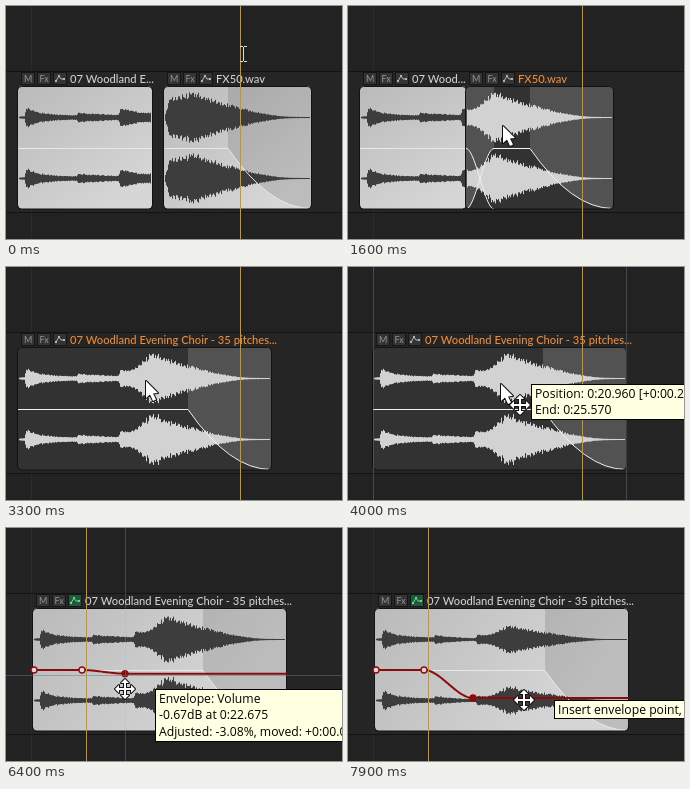
An HTML page with a canvas for the animation above (8 s loop, 336 px wide and 233 px high).

```html
<!DOCTYPE html>
<html>
<head>
<meta charset="utf-8">
<style>
html, body { margin: 0; width: 100%; height: 100%; overflow: hidden; background: #222; }
canvas { display: block; }
</style>
</head>
<body>
<canvas width="336" height="233"></canvas>
<script>
const c = document.querySelector('canvas').getContext('2d');
const W = 336, H = 233, TOP = 80, BOTTOM = 203, MID = 142;
const LOOP = 8000, STEP = 100, PX_PER_SEC = 54.88;
const TITLE = '07 Woodland Evening Choir - 35 pitches...';
const TITLE_FONT = '500 11.2px Lato, sans-serif';
const TIP_FONT = '500 12.2px "Open Sans", sans-serif';

const clamp = v => Math.max(0, Math.min(1, v));
const smooth = v => { v = clamp(v); return v * v * (3 - 2 * v); };
const noise = n => { const s = Math.sin(n * 127.1) * 43758.5; return s - Math.floor(s); };

// Linear interpolation through [position, value] points.
function along(points, p) {
  if (p <= points[0][0]) return points[0][1];
  for (let i = 1; i < points.length; i++) {
    const [a, va] = points[i - 1], [b, vb] = points[i];
    if (p <= b) return va + (vb - va) * (p - a) / (b - a);
  }
  return points[points.length - 1][1];
}

// Time, x, y of the pointer.
const path = [
  [0, 237, 48], [500, 195, 118], [600, 195, 118], [900, 183, 119], [1400, 155, 120],
  [1800, 155, 120], [2000, 110, 128], [2300, 219, 188], [2700, 140, 114], [3500, 140, 114],
  [4000, 153, 117], [4300, 155, 118], [4900, 69, 73], [5200, 69, 73], [5500, 72, 130],
  [5700, 76, 141], [6100, 119, 141], [6300, 119, 158], [7000, 119, 180], [7200, 119, 180],
  [7400, 125, 185], [7500, 125, 185], [7900, 176, 172]
];
const pointer = t => ({
  x: along(path.map(k => [k[0], k[1]]), t),
  y: along(path.map(k => [k[0], k[2]]), t)
});

// Wave envelopes, half height in pixels by distance from the clip's left edge.
const chime = [[0, .8], [6, 1.5], [8, 11], [12, 8.5], [20, 5.5], [40, 3], [58, 2.5], [60, 5],
  [75, 4], [100, 3], [102, 9.5], [110, 8.5], [120, 6], [134, 5]];
const blast = [[0, 1], [3, 12], [5, 20], [20, 24], [30, 28], [40, 21], [64, 14], [82, 8.5],
  [103, 3.5], [115, 1.6], [125, .8], [147, .5]];
const grain = n => .72 + .28 * noise(n);
const chimeAmp = x => along(chime, x) * grain(x);
const blastAmp = x => along(blast, x) * grain(x + 300);
const gluedAmp = x => {
  const f = smooth((x - 106) / 28);
  return (x < 134 ? chimeAmp(x) * (1 - f) : 0) + (x >= 106 ? blastAmp(x - 106) * f : 0);
};

function line(color, draw, width = 1) {
  c.strokeStyle = color;
  c.lineWidth = width;
  c.beginPath();
  draw();
  c.stroke();
}
const rect = (color, x, y, w, h) => { c.fillStyle = color; c.fillRect(x, y, w, h); };
const vertical = (x, color) => rect(color, x, 0, 1, H);

function text(str, x, y, color, font) {
  c.font = font;
  c.fillStyle = color;
  c.fillText(str, x, y);
}

function sCurve(x0, y0, x1, y1) {
  for (let x = x0; x <= x1; x++) c.lineTo(x, y0 + (y1 - y0) * smooth((x - x0) / (x1 - x0)));
}

function fadeCurve(x0, x1) {
  c.lineTo(x0, MID + .5);
  c.quadraticCurveTo((x0 + x1) / 2, BOTTOM - .5, x1, BOTTOM - .5);
}

// Fills the part of a fade that lies above its curve.
function shade(color, x0, x1, curve) {
  c.beginPath();
  c.moveTo(x0, TOP);
  curve();
  c.lineTo(x1, TOP);
  c.fillStyle = color;
  c.fill();
}

function fit(str, width) {
  c.font = TITLE_FONT;
  let n = 13;
  while (n > 1 && c.measureText(str.slice(0, n).trim() + '...').width > width) n--;
  return str.slice(0, n).trim() + '...';
}

function header(x, title, selected, green) {
  for (let i = 0; i < 3; i++) {
    const bx = x + 3 + i * 16, on = green && i === 2;
    rect('#161616', bx, 66, 14, 13);
    rect(on ? '#1f5a3a' : '#343434', bx + 1, 67, 12, 11);
    if (i < 2) text(['M', 'Fx'][i], bx + (i ? 2.5 : 3), 76, '#949494', '9px Lato, sans-serif');
    else {
      const color = on ? '#6fd494' : '#b4b4b4';
      line(color, () => {
        c.moveTo(bx + 3, 75); c.lineTo(bx + 6, 70); c.lineTo(bx + 8, 73); c.lineTo(bx + 11, 73);
      });
      rect(color, bx + 2, 74, 2, 2);
      rect(color, bx + 5, 69, 2, 2);
      rect(color, bx + 10, 72, 2, 2);
    }
  }
  text(title, x + 52, 77, selected ? '#ee8b3c' : '#cfcfcf', TITLE_FONT);
}

function item({ x, w, title, selected, amp, fade, cross = 0, green }) {
  const right = x + w, shadow = selected ? '#525252' : 'rgba(0,0,0,.12)';
  const fadeOut = () => fadeCurve(x + fade, right);
  const fadeIn = () => sCurve(x, BOTTOM, x + cross, MID + .5);
  header(x, title, selected, green);
  c.save();
  c.beginPath();
  c.roundRect(x, TOP, w, BOTTOM - TOP, 4);
  c.clip();
  const g = c.createLinearGradient(x, TOP, x + w * .7, BOTTOM);
  g.addColorStop(0, '#bababa');
  g.addColorStop(1, '#d6d6d6');
  rect(selected ? '#323232' : g, x, TOP, w, BOTTOM - TOP);
  if (fade) shade(shadow, x + fade, right, fadeOut);
  if (cross) shade(shadow, x, x + cross, fadeIn);
  c.fillStyle = selected ? '#d2d2d2' : '#3d3d3d';
  for (let i = 1; i < w - 1; i++) {
    const a = Math.max(.5, amp(i)), b = Math.max(.5, a * (.92 + .12 * noise(i + 9)));
    c.fillRect(x + i, 111.5 - a, 1, 2 * a);
    c.fillRect(x + i, 172.5 - b, 1, 2 * b);
  }
  line(selected ? '#f0f0f0' : '#e8e8e8', () => {
    if (cross) fadeIn();
    else c.moveTo(x, MID + .5);
    if (fade) fadeOut();
    else c.lineTo(right, MID + .5);
    if (cross) { c.moveTo(x, MID + .5); sCurve(x, MID + .5, x + cross, BOTTOM); }
  });
  c.restore();
  line('#121212', () => c.roundRect(x - .5, TOP + .5, w + 1, BOTTOM - TOP - .5, 4));
}

function tooltip(m, rows) {
  c.font = TIP_FONT;
  const x = Math.round(m.x) + 30, y = Math.round(m.y);
  const w = Math.max(...rows.map(r => c.measureText(r).width)) + 9;
  const h = rows.length * 17 + 2;
  rect('#000', x, y, w, h);
  rect('#ffffe1', x + 1, y + 1, w - 2, h - 2);
  rows.forEach((r, i) => text(r, x + 4, Math.round(y + 13.5 + i * 16.5), '#000', TIP_FONT));
}

function outlined(x, y, points) {
  c.beginPath();
  points.forEach(([a, b]) => c.lineTo(x + a, y + b));
  c.closePath();
  c.lineJoin = 'round';
  c.strokeStyle = '#111';
  c.lineWidth = 2;
  c.stroke();
  c.fillStyle = '#fff';
  c.fill();
}

const arrow = (x, y) =>
  outlined(x, y, [[0, 0], [0, 17], [4, 13.5], [7, 20], [10, 18.5], [7, 12.5], [12, 12]]);

function cross(x, y) {
  const arm = [[-1, -1], [-1, -6], [-4, -6], [0, -10], [4, -6], [1, -6], [1, -1]];
  const points = [];
  for (let k = 0; k < 4; k++)
    for (const [a, b] of arm) points.push([[a, b], [-b, a], [-a, -b], [b, -a]][k]);
  outlined(x, y, points);
}

function ibeam(x, y, color) {
  rect(color, x, y - 7, 1, 14);
  for (const dy of [-8, 7]) {
    rect(color, x - 3, y + dy, 3, 1);
    rect(color, x + 1, y + dy, 3, 1);
  }
}

function fadeCursor(x, y) {
  for (const s of [-1, 1])
    outlined(x, y, [[s * 6, -1], [s * 8, -1], [s * 8, -4], [s * 12, 0], [s * 8, 4], [s * 8, 1], [s * 6, 1]]);
  for (const [color, width] of [['#eee', 4], ['#111', 2]])
    line(color, () => {
      c.moveTo(x - 5, y + 4); c.lineTo(x - 5, y - 3); c.lineTo(x, y - 3);
      c.quadraticCurveTo(x + 5, y - 3, x + 6, y + 4);
    }, width);
}

function drawPointer(t, m) {
  const x = Math.round(m.x), y = Math.round(m.y);
  if (t < 400) ibeam(x, y, '#ddd');
  else if (t >= 2200 && t < 2500) fadeCursor(x, y);
  else if (t >= 6000) cross(x, y);
  else {
    if (t >= 3600 && t < 4300) cross(x + 19, y + 21);
    if (t >= 5300 && t < 5700) ibeam(x - 2, y + 1, '#0a0a0a');
    arrow(x, y);
  }
}

const clock = s => '0:' + s.toFixed(3).padStart(6, '0');
const timeAt = x => 20.96 + (x - 25) / PX_PER_SEC;

function dragTip(m, x, w, from) {
  const d = (x - from) / PX_PER_SEC;
  tooltip(m, [
    `Position: ${clock(timeAt(x))} [${d < 0 ? '-' : '+'}${clock(Math.abs(d))}]`,
    `End: ${clock(timeAt(x + w))}`
  ]);
}

function knob(x, y, filled) {
  c.beginPath();
  c.arc(x, y, 3, 0, 7);
  c.fillStyle = filled ? '#8c0a0a' : '#e4d6d6';
  c.fill();
  c.strokeStyle = '#8c0a0a';
  c.lineWidth = 1.3;
  c.stroke();
}

function twoClips(t, m) {
  const x = t < 600 ? 158 : Math.round(158 + Math.min(0, Math.max(-40, m.x - 195)));
  const fx = t < 1400 ? x : 118;
  const overlap = Math.max(0, 146 - fx), first = Math.min(146, fx) - 12;
  item({
    x: 12, w: first, title: fit('07 Woodland Evening', first - 50),
    selected: t >= 2000, amp: chimeAmp
  });
  item({
    x: fx, w: 147, title: 'FX50.wav', selected: t >= 600, fade: 64, cross: overlap,
    amp: i => i < overlap
      ? blastAmp(i) * smooth(i / overlap) + chimeAmp(i + fx - 12) * (1 - smooth(i / overlap))
      : blastAmp(i)
  });
  return fx;
}

const point = (t, m) => t < 7400
  ? { x: m.x, y: Math.max(MID, m.y - 15.5) }
  : { x: 125, y: 170 };

function envelope(t, p) {
  if (t < 5700) {
    rect('#8c0a0a', 27, MID - 1, 254, 2);
    rect('#b01818', 27, 140, 3, 3);
    return;
  }
  const moved = t >= 6200;
  line('#8c0a0a', () => {
    c.moveTo(27, MID);
    c.lineTo(76, MID);
    if (moved) sCurve(76, MID, p.x, p.y);
    c.lineTo(281, moved ? p.y : MID);
  }, 2);
  knob(28, MID);
  knob(76, MID);
  if (moved) knob(p.x, p.y, true);
}

function render(t) {
  const m = pointer(t), p = point(t, m), drop = (p.y - MID) / 22.5;
  const dragFx = t >= 700 && t < 1500, dragGlued = t >= 3600 && t < 4300;
  const dragPoint = t >= 6300 && t < 7500;
  rect('#222', 0, 0, W, H);
  rect('#252525', 0, 66, W, 140);
  vertical(25, '#2b2b2b');
  rect('#131313', 0, 65, W, 1);
  rect('#131313', 0, 206, W, 1);

  let x = 12, w = 253, from = 12;
  if (t < 3000) {
    x = twoClips(t, m);
    w = 147;
    from = 158;
  } else {
    x = t < 3500 ? 12 : t < 4300 ? Math.round(m.x - 128) : 27;
    const gain = i => t < 6200 ? 1 : 10 ** (-4.15 * drop / 20 * smooth((x + i - 76) / (p.x - 76)));
    item({
      x, w, title: TITLE, selected: t < 5700, fade: 170, green: t >= 5000,
      amp: i => gluedAmp(i) * gain(i)
    });
    if (t >= 5000) envelope(t, p);
  }
  if (dragFx || dragGlued) {
    vertical(x, 'rgba(105,130,150,.4)');
    vertical(x + w, 'rgba(105,130,150,.4)');
  }
  if (dragPoint) {
    vertical(Math.round(p.x), 'rgba(170,185,190,.25)');
    rect('rgba(90,125,145,.5)', 0, Math.round(p.y) + 1, W, 1);
  }
  vertical(t < 5200 ? 234 : 80, '#cf941f');

  if (dragFx || dragGlued) dragTip(m, x, w, from);
  else if (dragPoint) {
    tooltip(m, [
      'Envelope: Volume',
      `${(-4.15 * drop).toFixed(2)}dB at ${clock(timeAt(p.x + .1))}`,
      `Adjusted: ${(-19 * drop).toFixed(2)}%, moved: +0:00.000`
    ]);
  } else if (t >= 6000 && t < 6300 || t >= 7700)
    tooltip(m, ['Insert envelope point, or drag to edit']);
  drawPointer(t, m);
}

function tick(now) {
  render(Math.floor(now % LOOP / STEP) * STEP);
  requestAnimationFrame(tick);
}
requestAnimationFrame(tick);
</script>
</body>
</html>
```
